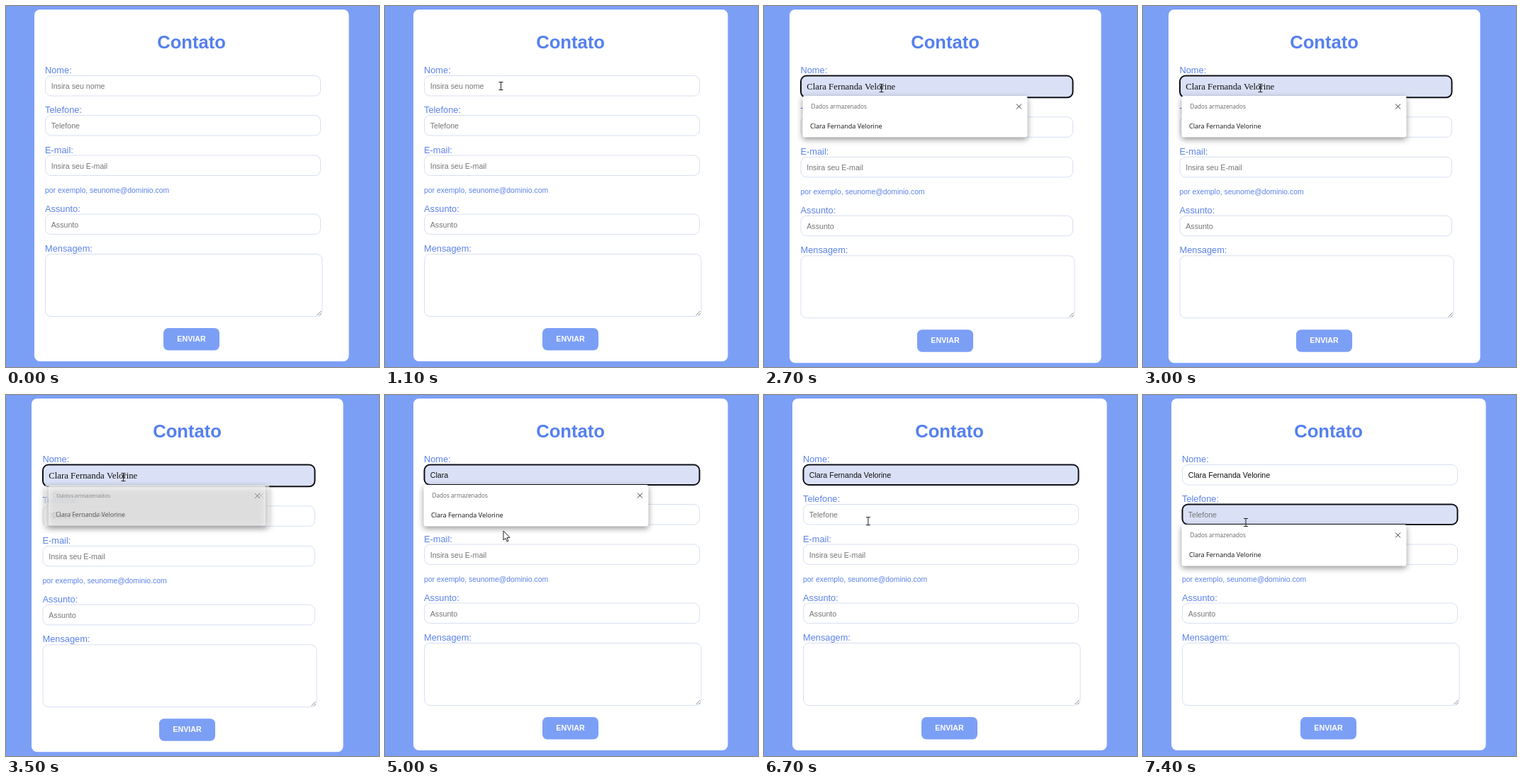
These frames come from a looping animation (526x510 px, 8 s). An HTML page with a canvas:

```html
<!DOCTYPE html>
<html lang="pt-BR">
<head>
<meta charset="utf-8">
<title>Contato</title>
<style>
html, body { margin: 0; width: 100%; height: 100%; overflow: hidden; background: #7c9ff6; }
canvas { display: block; }
</style>
</head>
<body>
<canvas id="stage" width="526" height="510"></canvas>
<script>
const ctx = document.getElementById('stage').getContext('2d');
const NAME = 'Clara Fernanda Velorine';
const BLUE = '#7c9ff6', INK = '#5b82ea', GREY = '#757575';
const ARIAL = '"Liberation Sans", Arial, sans-serif';
const TIMES = '"Liberation Serif", "Times New Roman", serif';
const UI = '"Open Sans", "Noto Sans", sans-serif';
const LOOP = 8000, STEP = 100;

// Pointer path: time, x, y
const PATH = [
  [500, 514, 66], [1100, 163, 113], [1600, 163, 113], [1700, 165, 116],
  [3900, 165, 116], [4100, 157, 193], [4400, 157, 193], [4600, 167, 192],
  [5000, 167, 192], [5300, 154, 171], [6300, 154, 171], [6800, 144.5, 180]
];

const ramp = (t, a, b) => Math.min(1, Math.max(0, (t - a) / (b - a)));
const within = (t, a, b) => t >= a && t < b;

function text(s, x, y, size, color, family = ARIAL, weight = '', align = 'left') {
  ctx.font = `${weight} ${size}px ${family}`;
  ctx.fillStyle = color;
  ctx.textAlign = align;
  ctx.fillText(s, x, y);
}

function box(x, y, w, h, r, fill, stroke, line = 1) {
  ctx.beginPath();
  ctx.roundRect(x, y, w, h, r);
  if (fill) { ctx.fillStyle = fill; ctx.fill(); }
  if (stroke) { ctx.strokeStyle = stroke; ctx.lineWidth = line; ctx.stroke(); }
}

function strokeLines(color, width, ...lines) {
  ctx.strokeStyle = color;
  ctx.lineWidth = width;
  ctx.beginPath();
  for (const [x1, y1, x2, y2] of lines) {
    ctx.moveTo(x1, y1);
    ctx.lineTo(x2, y2);
  }
  ctx.stroke();
}

function field(x, y, w, h, focused) {
  if (focused) box(x + .5, y + .5, w - 1, h - 1, 8, '#dae1f6', '#101018', 2);
  else box(x + .5, y + .5, w - 1, h - 1, 8, '#fff', '#d8dff3');
}

function drawForm(t) {
  const preview = within(t, 2400, 4500);
  const left = preview ? 51.5 : 55, width = preview ? 384.5 : 389;
  const dy = preview ? 2.3 : 0, mid = preview ? 255.5 : 261.5;
  const focus = t < 1400 ? '' : t < 6900 ? 'name' : 'phone';

  ctx.fillStyle = BLUE;
  ctx.fillRect(0, 0, 526, 510);
  box(preview ? 36 : 40, 5, preview ? 439.5 : 443.5, 497 + dy, 8, '#fff');
  text('Contato', mid, 60, 25.6, '#5580ee', ARIAL, 'bold', 'center');

  const row = (label, hint, y, focused) => {
    text(label, left, y - 3, 12.8, INK);
    field(left, y, width, 29.5, focused);
    text(hint, left + 8.7, y + 19, 10.67, GREY);
  };
  text('Nome:', left, 95, 12.8, INK);
  field(left, 98, width, 29.5 + dy, focus === 'name');
  const fx = left + 8.7;
  let value = '';
  if (preview) text(NAME, fx, 118, 12.8, '#111', TIMES);
  else {
    if (t >= 6000) value = NAME;
    else if (t >= 4500) value = NAME.slice(0, Math.min(5, (t - 4500) / 100 + 1));
    text(value || 'Insira seu nome', fx, 117, 10.67, value ? '#111' : GREY);
  }

  row('Telefone:', 'Telefone', 154 + dy, focus === 'phone');
  row('E-mail:', 'Insira seu E-mail', 210.5 + dy);
  text('por exemplo, seunome@dominio.com', left, 264 + dy, 10.4, INK);
  row('Assunto:', 'Assunto', 293.5 + dy);

  text('Mensagem:', left, 347 + dy, 12.8, INK);
  const areaW = width + 2.5, areaY = 350 + dy;
  field(left, areaY, areaW, 89);
  const cx = left + areaW - 2, cy = areaY + 87;
  strokeLines('#666', .8, [cx - 6, cy, cx, cy - 6], [cx - 2.5, cy, cx, cy - 2.5]);

  box(mid - 39.5, 455 + dy, 79, 31.5, 7, BLUE);
  text('ENVIAR', mid, 474 + dy, 10.67, '#fff', ARIAL, 'bold', 'center');

  // Text caret
  ctx.fillStyle = '#111';
  if (within(t, 1400, 1900)) ctx.fillRect(64, 106, 1, 13);
  if (within(t, 6000, 6500)) ctx.fillRect(fx + ctx.measureText('').width + nameWidth(value), 107, 1, 12);
  if (within(t, 6900, 7400)) ctx.fillRect(64, 162, 1, 13);
}

function nameWidth(s) {
  ctx.font = `10.67px ${ARIAL}`;
  return ctx.measureText(s).width;
}

function popupCard(alpha, scale, hover) {
  ctx.save();
  ctx.globalAlpha = alpha;
  ctx.translate(213, 156.5);
  ctx.scale(scale, scale);
  ctx.translate(-213, -156.5);
  ctx.shadowColor = 'rgba(0,0,0,.42)';
  ctx.shadowBlur = 9;
  ctx.shadowOffsetY = 3;
  box(54.5, 127, 317, 58.5, 3, '#fff');
  ctx.shadowColor = 'transparent';
  text('Dados armazenados', 66.5, 145, 8.2, '#666', UI);
  strokeLines('#333', 1, [356, 138.5, 363, 145.5], [363, 138.5, 356, 145.5]);
  if (hover) box(58.5, 155.5, 309.5, 26.5, 1, '#e0edf6', '#6eaadb');
  text(NAME, 65, 172.5, 9.1, '#111', UI);
  ctx.restore();
}

function popupAlpha(t) {
  return ramp(t, 1300, 1500) - ramp(t, 3300, 3800) + ramp(t, 4400, 4700)
    - ramp(t, 6100, 6500) + ramp(t, 6900, 7200);
}

function drawPopup(t) {
  const alpha = popupAlpha(t);
  if (alpha <= 0.001) return;
  const hover = within(t, 5200, 6500);
  ctx.save();
  if (t >= 6900) ctx.translate(0, 56);
  popupCard(alpha, 1, hover);
  if (alpha < .999) popupCard(alpha, .966, hover);
  ctx.restore();
}

function pointerAt(t) {
  const i = PATH.findIndex(p => p[0] > t);
  if (i < 0) return PATH[PATH.length - 1].slice(1);
  const [t0, x0, y0] = PATH[i - 1], [t1, x1, y1] = PATH[i];
  const k = ramp(t, t0, t1);
  return [x0 + (x1 - x0) * k, y0 + (y1 - y0) * k];
}

function drawPointer(t) {
  if (t < PATH[0][0]) return;
  const [x, y] = pointerAt(t);
  const overName = y > 98 && y < 128;
  const overPhone = y > 154 && y < 184 && (t >= 6900 || popupAlpha(t) < .01);
  ctx.save();
  ctx.translate(x, y);
  if (x < 444 && (overName || overPhone)) {
    strokeLines('#222', 1, [.5, -5.5, .5, 5.5], [-2.5, -5.5, 3.5, -5.5], [-2.5, 5.5, 3.5, 5.5]);
  } else {
    ctx.beginPath();
    const arrow = [[0, 0], [0, 13], [3, 10.3], [5, 15], [7, 14], [5, 9.6], [9, 9.3]];
    arrow.forEach(p => ctx.lineTo(...p));
    ctx.closePath();
    ctx.fillStyle = '#fff';
    ctx.fill();
    ctx.strokeStyle = '#222';
    ctx.lineWidth = 1;
    ctx.stroke();
  }
  ctx.restore();
}

const start = performance.now();
function frame() {
  const t = Math.floor((performance.now() - start) % LOOP / STEP) * STEP;
  drawForm(t);
  drawPopup(t);
  drawPointer(t);
  requestAnimationFrame(frame);
}
frame();
</script>
</body>
</html>
```
